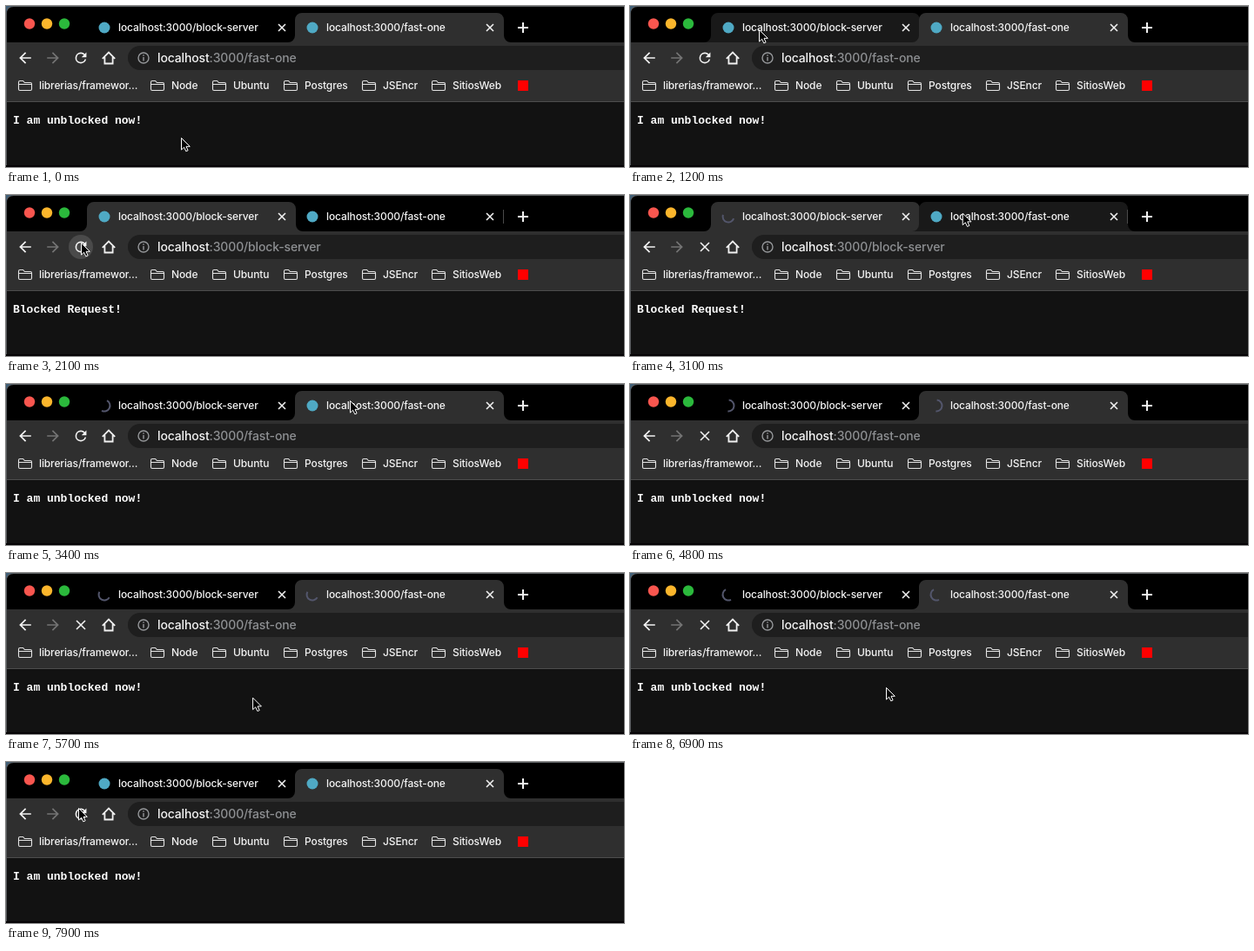
These frames come from a looping animation (710x186 px, 8000 ms). An HTML page:

```html
<!DOCTYPE html>
<html lang="en">
<head>
<meta charset="utf-8">
<title>Blocked request demo</title>
<style>
  html, body { margin: 0; width: 100%; height: 100%; overflow: hidden; background: #000; }
  svg { display: block; width: 710px; height: 186px; }
  text { font-family: Inter, Roboto, sans-serif; font-weight: 500; letter-spacing: -0.01em; white-space: pre; }
  .label { font-size: 12px; fill: #f4f4f4; }
  .url { font-size: 14px; fill: #f4f4f4; }
  .url .rest { fill: #8e9093; }
  .page { font: bold 13px "Liberation Mono", "DejaVu Sans Mono", monospace; letter-spacing: 0; fill: #fff; }
  .line { fill: none; stroke: #f1f1f1; stroke-width: 1.6; }
</style>
</head>
<body>
<svg id="stage" viewBox="0 0 710 186">
  <defs>
    <path id="tabShape" d="M-8 42a8 8 0 0 0 8-8V16a8 8 0 0 1 8-8H232a8 8 0 0 1 8 8V34a8 8 0 0 0 8 8z"/>
    <path id="folder" d="M.5 2Q.5.5 2 .5H5.6L7.4 2.5H14Q15.5 2.5 15.5 4V10Q15.5 11.5 14 11.5H2Q.5 11.5.5 10zM.5 4.5H15.5" fill="none" stroke="#e4e4e4" stroke-width="1.1"/>
    <path id="arrow" d="M20 11H7.8l5.6-5.6L12 4l-8 8 8 8 1.4-1.4L7.8 13H20z"/>
  </defs>

  <rect width="710" height="186" fill="#41617a"/>
  <path d="M0 186V9Q0 0 9 0H710V186z" fill="#5a5d60"/>
  <path d="M1 186V9Q1 1 9 1H710V186z"/>
  <circle cx="27" cy="20.5" r="6.2" fill="#f9564f"/>
  <circle cx="47" cy="20.5" r="6.2" fill="#fbb62c"/>
  <circle cx="67" cy="20.5" r="6.2" fill="#2bb93c"/>

  <rect x="1" y="42" width="709" height="68" fill="#2f2f2f"/>
  <g id="tabs"></g>
  <path id="divider" d="M571.5 17V33" stroke="#4a4a4a"/>
  <path class="line" d="M588 25H600M594 19V31" style="stroke-width:2"/>

  <use href="#arrow" transform="translate(11.8 49.8) scale(.85)" fill="#f4f4f4"/>
  <use href="#arrow" transform="translate(64.2 49.8) scale(-.85 .85)" fill="#747474"/>
  <circle id="hover" cx="86" cy="60" r="14" fill="#4a4a4a"/>
  <path id="reload" transform="translate(76.4 50.4) scale(.8)" fill="#f4f4f4" d="M17.65 6.35A7.96 7.96 0 0 0 12 4a8 8 0 1 0 7.73 10h-2.08A6 6 0 1 1 12 6c1.66 0 3.14.69 4.22 1.78L13 11h7V4z"/>
  <path id="stop" class="line" d="M81 55L91 65M91 55L81 65"/>
  <path class="line" d="M110.8 60.8L118 53.6L125.2 60.8M113.4 59V66.5H122.6V59" style="stroke-width:1.8"/>

  <rect x="140" y="46" width="600" height="28" rx="14" fill="#1e1e1e"/>
  <g fill="none" stroke="#96989b" stroke-width="1.4">
    <circle cx="158" cy="60" r="6"/>
    <path d="M158 59V63.4M158 56.3V57.8"/>
  </g>
  <text class="url" x="174" y="65">localhost<tspan class="rest" id="path"></tspan></text>

  <g id="bookmarks"></g>
  <rect x="588" y="86" width="12" height="12" fill="#f00"/>

  <rect x="1" y="110" width="709" height="76" fill="#121212"/>
  <rect x="1" y="110" width="709" height="1" fill="#4d4d4d"/>
  <rect y="184" width="710" height="2" fill="#060406"/>
  <text class="page" id="body" x="8" y="136"></text>

  <path id="cursor" d="M0 0V13.6L3.1 10.7L5.3 15.4L7.6 14.4L5.5 9.8H9.8z" fill="#000" stroke="#fff" stroke-linejoin="round"/>
</svg>
<script>
const LOOP = 8000, STEP = 100;
const SPIN_START = 2180, SPIN_TURN = 1320, LOAD_END = 7500;
const $ = id => document.getElementById(id);

function add(parent, tag, attrs, text) {
  const el = document.createElementNS("http://www.w3.org/2000/svg", tag);
  for (const key in attrs) el.setAttribute(key, attrs[key]);
  if (text) el.textContent = text;
  parent.appendChild(el);
  return el;
}
const show = (el, on) => el.setAttribute("visibility", on ? "visible" : "hidden");

const tabs = [
  { x: 93, cx: 113, path: ":3000/block-server", body: "Blocked Request!", loadAt: 2200 },
  { x: 332, cx: 352, path: ":3000/fast-one", body: "I am unblocked now!", loadAt: 4300 }
];
for (const tab of tabs) {
  const g = $("tabs");
  tab.shape = add(g, "use", { href: "#tabShape", x: tab.x });
  tab.icon = add(g, "circle", { cx: tab.cx, cy: 25, r: 6.5, fill: "#4fa9c4" });
  tab.spinner = add(g, "path", { fill: "none", stroke: "#53566c", "stroke-width": 2 });
  add(g, "text", { class: "label", x: tab.cx + 16, y: 29 }, "localhost" + tab.path);
  const cross = tab.x + 224;
  add(g, "path", { class: "line", d: `M${cross - 4} 21l8 8m0-8l-8 8` });
}

const bookmarks = [[14, "librerias/framewor…"], [166, "Node"], [237, "Ubuntu"],
  [319, "Postgres"], [409, "JSEncr"], [489, "SitiosWeb"]];
for (const [x, name] of bookmarks) {
  add($("bookmarks"), "use", { href: "#folder", x, y: 86 });
  add($("bookmarks"), "text", { class: "label", x: x + 24, y: 96 }, name);
}

// Pointer stops: time, x, y
const stops = [
  [0, 202, 153], [500, 202, 153], [1100, 149, 28], [1500, 149, 28],
  [2000, 87, 56], [2400, 87, 56], [3200, 396, 20], [3500, 396, 20],
  [4100, 85, 55], [4300, 85, 55], [4800, 200, 192], [5200, 240, 192],
  [5900, 295, 133], [7600, 295, 133], [7900, 84, 54], [8000, 84, 54]
];
function pointer(t) {
  const i = stops.findIndex(s => s[0] > t);
  const [t0, x0, y0] = stops[i - 1], [t1, x1, y1] = stops[i];
  const p = (t - t0) / (t1 - t0), e = p * p * (3 - 2 * p);
  return [x0 + (x1 - x0) * e, y0 + (y1 - y0) * e];
}

// Half ring turning counter-clockwise; its tail waits at the top at first
function ring(cx, t) {
  const head = 90 + 360 * (t - SPIN_START) / SPIN_TURN;
  const tail = Math.max(head - 180, 90);
  const at = deg => {
    const a = deg * Math.PI / 180;
    return `${cx + 6.5 * Math.cos(a)} ${25 - 6.5 * Math.sin(a)}`;
  };
  return `M${at(tail)}A6.5 6.5 0 0 0 ${at(head)}`;
}

function tabFill(tab, active, x, y) {
  if (active) return "#2f2f2f";
  const over = x > tab.x && x < tab.x + 239 && y > 8 && y < 42;
  return over ? "#191919" : "none";
}

function draw(t) {
  const [x, y] = pointer(t);
  const current = t >= 1300 && t < 3300 ? tabs[0] : tabs[1];
  const loading = tab => t >= tab.loadAt && t < LOAD_END;

  for (const tab of tabs) {
    const busy = loading(tab);
    tab.shape.setAttribute("fill", tabFill(tab, tab === current, x, y));
    show(tab.icon, !busy);
    show(tab.spinner, busy);
    if (busy) tab.spinner.setAttribute("d", ring(tab.cx, t));
  }
  show($("divider"), current === tabs[0]);
  show($("stop"), loading(current));
  show($("reload"), !loading(current));
  show($("hover"), t < 7700 && Math.hypot(x - 86, y - 60) < 14);
  $("path").textContent = current.path;
  $("body").textContent = current.body;
  $("cursor").setAttribute("transform", `translate(${x - 0.5} ${y - 0.5})`);
}

const start = performance.now();
function tick() {
  const t = (performance.now() - start) % LOOP;
  draw(Math.floor(t / STEP) * STEP);
  requestAnimationFrame(tick);
}
tick();
</script>
</body>
</html>
```
